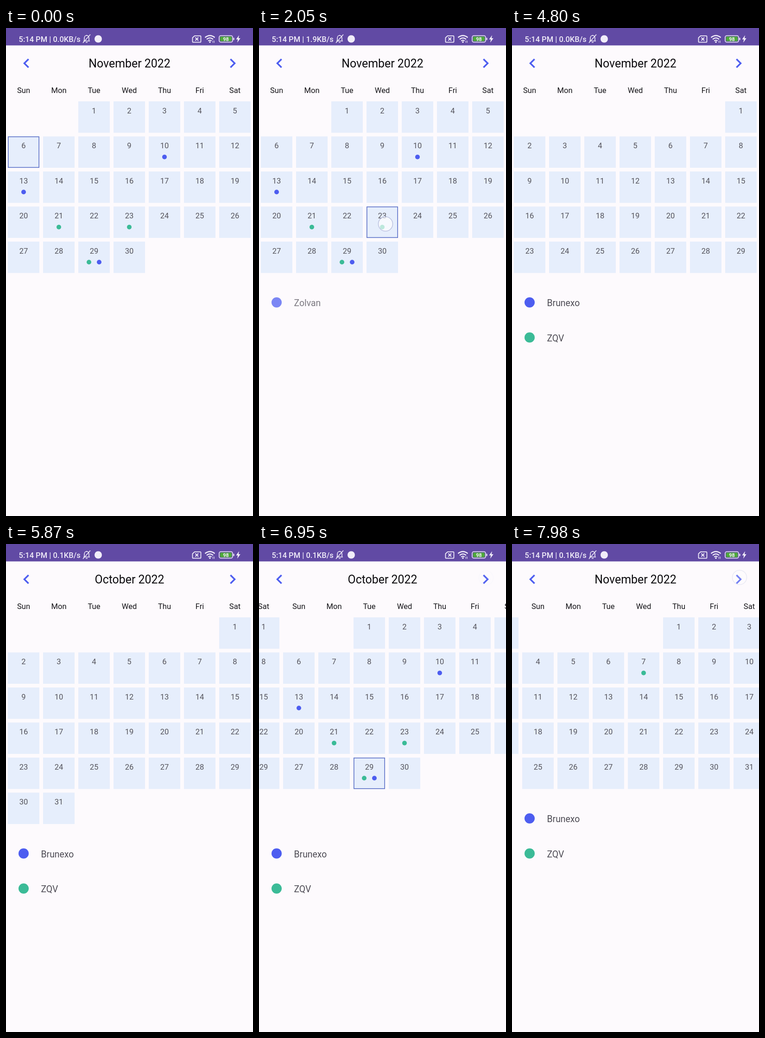
An HTML page with a canvas for the animation above (8000 ms loop, 533 by 1051 pixels).

```html
<!DOCTYPE html>
<html lang="en">
<head>
<meta charset="utf-8">
<title>Event calendar</title>
<style>
  html, body { margin: 0; width: 100%; height: 100%; overflow: hidden; background: #fdfafd; }
  canvas { display: block; }
</style>
</head>
<body>
<canvas id="stage" width="533" height="1051"></canvas>
<script>
const ctx = document.getElementById('stage').getContext('2d');
const W = 533, H = 1051, LOOP = 8000;
const COL = 76, ROW = 75.5, TOP = 158, CELL = 68, PAGE = 7 * COL;
const BLUE = '#4d5df0', GREEN = '#3bbb97', BG = '#fdfafd', BAR = '#614aa4';
const WEEKDAYS = ['Sun', 'Mon', 'Tue', 'Wed', 'Thu', 'Fri', 'Sat'];

// first: weekday of day 1
const MONTHS = [
  { name: 'October 2022', first: 6, days: 31, dots: {} },
  { name: 'November 2022', first: 2, days: 30,
    dots: { 10: [BLUE], 13: [BLUE], 21: [GREEN], 23: [GREEN], 29: [GREEN, BLUE] } },
  { name: 'December 2022', first: 4, days: 31, dots: { 7: [GREEN] } }
];
const rowsOf = m => Math.ceil((MONTHS[m].first + MONTHS[m].days) / 7);

// Selected day of November and its event list
const A = ['Brunexo', BLUE], B = ['Zolvan', BLUE], C = ['ZQV', GREEN];
const PICKS = [
  { at: -999, day: 6, events: [] },
  { at: 370, day: 10, events: [A] },
  { at: 1200, day: 13, events: [B] },
  { at: 2020, day: 23, events: [C] },
  { at: 2960, day: 29, events: [A, C] }
];
const FADE = 120;

const SCROLLS = [
  { at: 4620, from: 1, to: 0 },
  { at: 6820, from: 0, to: 1 },
  { at: 7828, from: 1, to: 2 }
];
const SCROLL_MS = 188, RESIZE_MS = 200;

// x, y, press, release
const TOUCHES = [
  [347, 270, 270, 370], [43, 347, 1100, 1200], [273, 422, 1900, 2020],
  [195, 497, 2870, 2960], [44, 73, 4500, 4610], [490, 73, 6680, 6780], [491, 72, 7720, 7850]
];

const SPEEDS = [[0, '0.0'], [2030, '1.9'], [4030, '0.0'], [5870, '0.1']];

const clamp = v => Math.max(0, Math.min(1, v));
const lastBefore = (list, t, time) => list.filter(e => time(e) <= t).pop();

function text(str, x, y, size, color, align = 'center', weight = 400) {
  ctx.font = `${weight} ${size}px Roboto, sans-serif`;
  ctx.textAlign = align;
  ctx.fillStyle = color;
  ctx.fillText(str, x, y);
}

function circle(x, y, r, color) {
  ctx.fillStyle = color;
  ctx.beginPath();
  ctx.arc(x, y, r, 0, 7);
  ctx.fill();
}

function stroke(path, color, width) {
  ctx.strokeStyle = color;
  ctx.lineWidth = width;
  ctx.stroke(new Path2D(path));
}

function box(x, y, w, h, r) {
  ctx.beginPath();
  ctx.roundRect(x, y, w, h, r);
}

function statusBar(t) {
  const white = '#f1edf9';
  ctx.fillStyle = BAR;
  ctx.fillRect(0, 0, W, 37.5);
  const speed = lastBefore(SPEEDS, t, s => s[0])[1];
  text(`5:14 PM | ${speed}KB/s`, 27.5, 29.5, 16.5, white, 'left', 500);

  // Muted bell and notification
  stroke('M167 28H181M169 27V22C169 14 179 14 179 22V27M172 31H176M174 15V17', white, 1.6);
  stroke('M182 14L166 32', white, 1.6);
  circle(199, 23.5, 8, white);

  // SIM, wifi
  stroke('M407 16.8H419Q420.5 16.8 420.5 18.5V29Q420.5 30.7 419 30.7H404Q402.5 30.7 402.5 29V21Z', white, 1.8);
  stroke('M408.5 20.5L415 27M415 20.5L408.5 27', white, 1.8);
  stroke('M429.5 20.5Q440 12 450.5 20.5M433 24.3Q440 18.5 447 24.3M436.3 27.8Q440 25 443.7 27.8', white, 2.3);
  circle(440, 30.3, 1.8, white);
  stroke('M446.5 27V32M449.3 27V32', white, 1);

  // Battery
  ctx.strokeStyle = white;
  ctx.lineWidth = 1.6;
  box(460, 16.5, 29, 14, 3.5);
  ctx.stroke();
  ctx.fillStyle = '#4ea93a';
  box(462, 18.5, 25, 10, 2);
  ctx.fill();
  text('98', 474.5, 27.6, 11, white, 'center', 700);
  ctx.fillStyle = white;
  ctx.fillRect(490.5, 21, 2, 5);
  ctx.fill(new Path2D('M503 15.5L496.5 24.5H500.3L499 31.5L505.8 22H501.8Z'));
}

function page(m, left, selected) {
  const { first, days, dots } = MONTHS[m];
  WEEKDAYS.forEach((d, i) => text(d, left + 38 + i * COL, 140, 16.6, '#161519'));
  for (let day = 1; day <= days; day++) {
    const slot = first + day - 1;
    const x = left + 4 + slot % 7 * COL, y = TOP + Math.floor(slot / 7) * ROW, mid = x + CELL / 2;
    ctx.fillStyle = '#e6eefc';
    ctx.fillRect(x, y, CELL, 67.6);
    if (m === 1 && day === selected) {
      ctx.strokeStyle = '#5d72c8';
      ctx.lineWidth = 1.6;
      ctx.strokeRect(x + 0.8, y + 0.8, CELL - 1.6, 66);
    }
    text(day, mid, y + 25.8, 16.6, '#55545c');
    const marks = dots[day] || [];
    marks.forEach((c, i) => circle(mid + (i - (marks.length - 1) / 2) * 22, y + 44.2, 5, c));
  }
}

function eventList(events, alpha, top) {
  ctx.globalAlpha = alpha;
  events.forEach(([name, color], i) => {
    circle(38, top + i * ROW, 11, color);
    text(name, 75.5, top + 8 + i * ROW, 19.4, '#4e4c55', 'left');
  });
  ctx.globalAlpha = 1;
}

function draw(t) {
  ctx.fillStyle = BG;
  ctx.fillRect(0, 0, W, H);
  statusBar(t);

  // The title and height follow only once the scroll has settled
  const scroll = lastBefore(SCROLLS, t, s => s.at) || { at: -999, from: 1, to: 1 };
  const progress = clamp((t - scroll.at) / SCROLL_MS);
  const remaining = Math.floor(PAGE * (1 - progress) ** 2);
  const resize = clamp((t - scroll.at - SCROLL_MS) / RESIZE_MS);
  const rows = rowsOf(scroll.from) +
    (rowsOf(scroll.to) - rowsOf(scroll.from)) * (1 - Math.cos(resize * Math.PI)) / 2;

  text(MONTHS[progress < 1 ? scroll.from : scroll.to].name, 266.5, 85, 24.9, '#0c0b0e');
  stroke('M48.6 66.9L39.5 76L48.6 85.1M484.4 66.9L493.5 76L484.4 85.1', BLUE, 3.5);

  const pick = lastBefore(PICKS, t, p => p.at);
  const previous = PICKS[PICKS.indexOf(pick) - 1];
  const dir = Math.sign(scroll.to - scroll.from);
  ctx.save();
  ctx.beginPath();
  ctx.rect(0, 110, W, TOP - 114 + rows * ROW);
  ctx.clip();
  if (progress < 1) page(scroll.from, dir * (remaining - PAGE), pick.day);
  page(scroll.to, dir * remaining, pick.day);
  ctx.restore();

  const listTop = 591 + (rows - 5) * ROW, age = t - pick.at;
  if (previous && age < FADE) eventList(previous.events, 1 - age / FADE, listTop);
  eventList(pick.events, clamp(age / FADE - 1), listTop);

  for (const [x, y, down, up] of TOUCHES) {
    if (t < down || t > up + 180) continue;
    ctx.globalAlpha = clamp((t - down) / 50) * (1 - clamp((t - up) / 180));
    circle(x, y, 15.5, 'rgba(255,255,255,.8)');
    ctx.strokeStyle = '#b4bbdc';
    ctx.lineWidth = 1.6;
    ctx.stroke();
    ctx.globalAlpha = 1;
  }
}

function tick() {
  draw(performance.now() % LOOP);
  requestAnimationFrame(tick);
}
tick();
</script>
</body>
</html>
```
